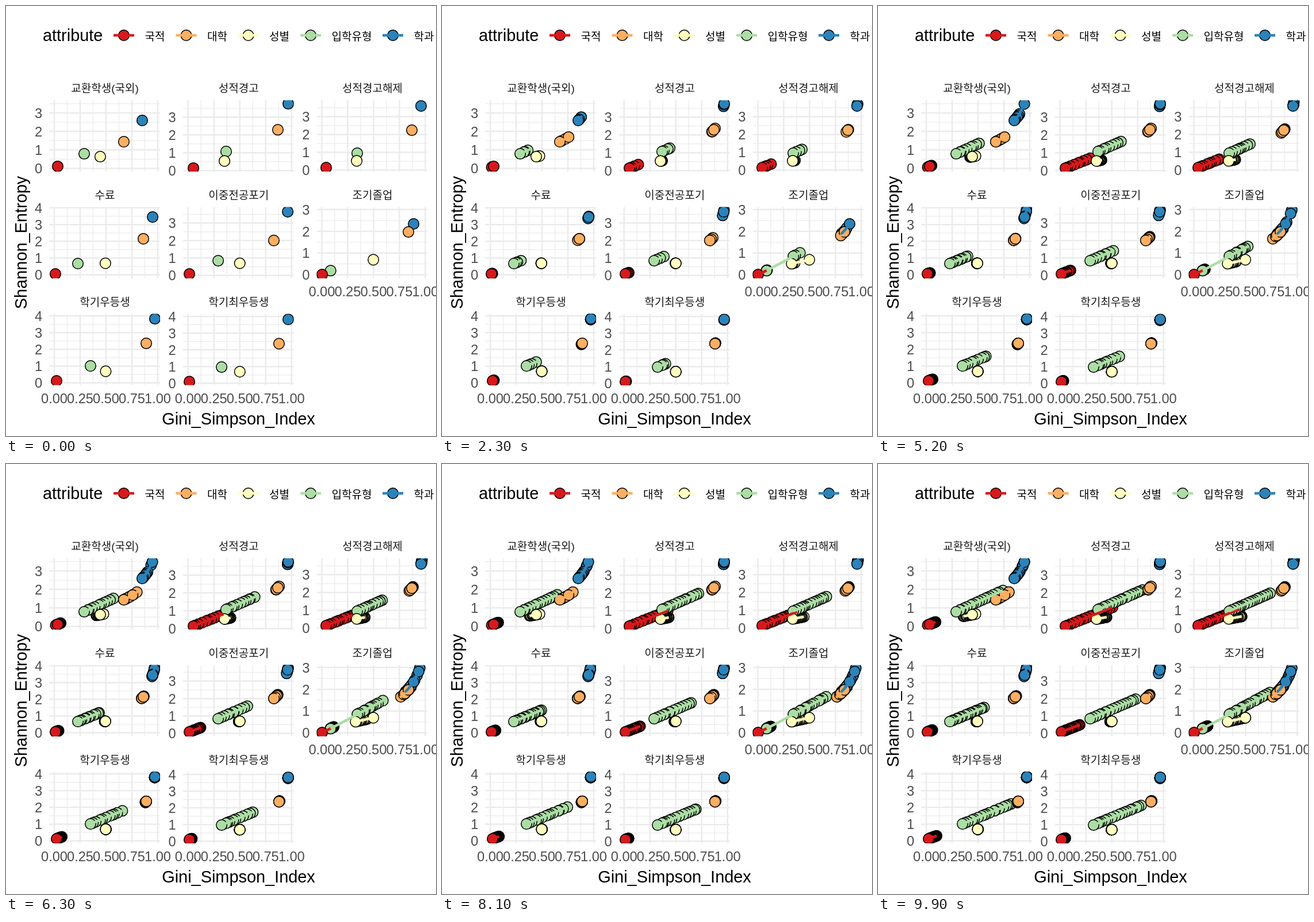
An HTML page with a canvas that plays this animation: 748x748 px, repeating every 10 s.

```html
<!DOCTYPE html>
<html lang="ko">
<head>
<meta charset="utf-8">
<style>
  html, body { margin: 0; width: 100%; height: 100%; overflow: hidden; background: #fff; }
  canvas { display: block; }
</style>
</head>
<body>
<canvas id="stage" width="748" height="748"></canvas>
<script>
const ctx = document.getElementById('stage').getContext('2d');
const FONT = '"Liberation Sans", "Noto Sans CJK KR", "Noto Sans CJK", sans-serif';
const LOOP = 10000, STEP = 100, SEMESTERS = 16;
const GRID = '#EBEBEB', TICK = '#4D4D4D';
const COL = 232.7, ROW = 185.8, WIDTH = 193, HEIGHT = 124, GINI = 180;

// Entropy (h) as a function of the Gini index (g), starting from a known point.
const linear = slope => (g, g0, h0) => h0 + slope * (g - g0);
const logarithmic = (g, g0, h0) => h0 + 0.85 * Math.log((1 - g0) / (1 - g));
const binary = g => {
  const p = (1 + Math.sqrt(Math.max(0, 1 - 2 * g))) / 2, q = 1 - p;
  return -p * Math.log(p) - (q && q * Math.log(q));
};

// Drifting attributes move steadily through their range, the others scatter in it.
const ATTRIBUTES = [
  { name: '국적', color: '#D7191C', keyX: 205, curve: linear(2.3), drifts: true },
  { name: '대학', color: '#FDAE61', keyX: 313.5, curve: logarithmic },
  { name: '성별', color: '#FFFFBF', keyX: 421.5, curve: binary, drifts: true },
  { name: '입학유형', color: '#ABDDA4', keyX: 530, curve: linear(2.55), drifts: true },
  { name: '학과', color: '#2B83BA', keyX: 673, curve: logarithmic }
];

const noise = n => {
  const v = Math.sin(n * 12.9898) * 43758.5453;
  return v - Math.floor(v);
};

const panels = [];

// Each attribute: first Gini index, first entropy, then the end and begin of the later range.
function addPanel(title, zero, unit, ...starts) {
  const n = panels.length;
  const x = 75 + n % 3 * COL, y = 164 + Math.floor(n / 3) * ROW, origin = x + 9;

  const lines = starts.map(([g0, h0, to, from = g0], k) => {
    const { curve, drifts } = ATTRIBUTES[k];
    return Array.from({ length: SEMESTERS + 1 }, (_, i) => {
      const random = noise(i + 20 * k + 100 * n + 1);
      const u = drifts ? Math.min(1, i / SEMESTERS + (random - 0.5) * 0.06) : random;
      const g = i ? from + (to - from) * u : g0;
      return { t: 9900 * i / SEMESTERS, k, x: origin + g * GINI, y: zero - curve(g, g0, h0) * unit };
    });
  });
  // Older points lie above newer ones; equal times stack from the last attribute to the first.
  const dots = lines.flat().sort((a, b) => b.t - a.t || b.k - a.k);
  panels.push({ title, zero, unit, x, y, origin, lines, dots, axis: n > 4 });
}

addPanel('교환학생(국외)', 282.5, 32.2,
  [.033, .11, .09, .011], [.672, 1.44, .8], [.444, .64, .356, .483], [.289, .79, .74], [.85, 2.59, .955]);
addPanel('성적경고', 286.3, 31,
  [.052, .14, .507], [.868, 2.29, .88, .85], [.352, .54, .45], [.368, 1.07, .8], [.968, 3.75, .968, .962]);
addPanel('성적경고해제', 285.5, 31,
  [.042, .14, .453], [.87, 2.24, .887, .842], [.337, .52, .464], [.342, .95, .736], [.959, 3.6, .972]);
addPanel('수료', 467.5, 29.1,
  [.011, .05, .06], [.861, 2.15, .87, .833], [.494, .69, .483], [.228, .67, .56], [.95, 3.45, .972, .944]);
addPanel('이중전공포기', 468.5, 30.3,
  [.013, .08, .19], [.829, 2, .868], [.5, .69, .483], [.291, .84, .73], [.963, 3.65, .968, .952]);
addPanel('조기졸업', 467.5, 37.8,
  [.003, .01, .135, .08], [.837, 1.97, .87, .76], [.498, .69, .5, .32], [.085, .19, .735, .32], [.887, 2.34, .948, .79]);
addPanel('학기우등생', 655.5, 29.1,
  [.022, .12, .1], [.889, 2.36, .889, .88], [.497, .69, .5], [.35, 1.01, .822], [.972, 3.83, .972, .97]);
addPanel('학기최우등생', 656.3, 29.1,
  [.013, .1, .052], [.879, 2.37, .885], [.5, .69, .497], [.324, .97, .795], [.968, 3.82, .968, .966]);

function text(str, x, y, size, color = '#000', align = 'left') {
  ctx.font = `${size}px ${FONT}`;
  ctx.fillStyle = color;
  ctx.textAlign = align;
  ctx.fillText(str, x, y);
}

function stroke(points, color, width) {
  ctx.beginPath();
  points.forEach(p => ctx.lineTo(p.x, p.y));
  ctx.strokeStyle = color;
  ctx.lineWidth = width;
  ctx.lineJoin = 'round';
  ctx.stroke();
}

function segment(x1, y1, x2, y2, color, width) {
  stroke([{ x: x1, y: y1 }, { x: x2, y: y2 }], color, width);
}

function dot(x, y, color) {
  ctx.beginPath();
  ctx.arc(x, y, 9.3, 0, 2 * Math.PI);
  ctx.fillStyle = color;
  ctx.fill();
  ctx.strokeStyle = '#000';
  ctx.lineWidth = 1.5;
  ctx.stroke();
}

// The part of a series passed by time t, ending in an interpolated tip.
function revealed(points, t) {
  const path = points.filter(p => p.t <= t);
  const next = points[path.length], last = path[path.length - 1];
  if (next) {
    const f = (t - last.t) / (next.t - last.t);
    path.push({ x: last.x + (next.x - last.x) * f, y: last.y + (next.y - last.y) * f });
  }
  return path;
}

function drawPanel(p, t) {
  const right = p.x + WIDTH, bottom = p.y + HEIGHT;
  text(p.title, p.x + 97, p.y - 14, 19, '#1A1A1A', 'center');

  ctx.save();
  ctx.beginPath();
  ctx.rect(p.x, p.y, WIDTH, HEIGHT);
  ctx.clip();
  for (const major of [false, true]) {
    const width = major ? 2.5 : 1.25;
    for (let i = major ? 0 : 1; i <= 8; i += 2) {
      const x = p.origin + i * GINI / 8, y = p.zero - i * p.unit / 2;
      segment(x, p.y, x, bottom, GRID, width);
      segment(p.x, y, right, y, GRID, width);
    }
  }
  p.dots.filter(d => d.t <= t).forEach(d => dot(d.x, d.y, ATTRIBUTES[d.k].color));
  p.lines.forEach((points, k) => stroke(revealed(points, t), ATTRIBUTES[k].color, 4.5));
  ctx.restore();

  for (let v = 0; p.zero - v * p.unit > p.y - 1; v++)
    text(v, p.x - 12, p.zero - v * p.unit + 8.7, 23.6, TICK, 'right');
  if (p.axis)
    for (let i = 0; i <= 4; i++)
      text((i / 4).toFixed(2), p.origin + i * GINI / 4, bottom + 31, 23.6, TICK, 'center');
}

function drawLegend() {
  text('attribute', 64, 61, 28.9);
  for (const { name, color, keyX } of ATTRIBUTES) {
    dot(keyX, 51, color);
    segment(keyX - 18, 51, keyX + 18, 51, color, 4.5);
    text(name, keyX + 36.5, 60, 19);
  }
}

function drawAxisTitles() {
  text('Gini_Simpson_Index', 404.5, 728, 28.9, '#000', 'center');
  ctx.save();
  ctx.translate(36, 411.5);
  ctx.rotate(-Math.PI / 2);
  text('Shannon_Entropy', 0, 0, 28.9, '#000', 'center');
  ctx.restore();
}

function render(now) {
  const t = Math.floor(now % LOOP / STEP) * STEP;
  ctx.fillStyle = '#fff';
  ctx.fillRect(0, 0, 748, 748);
  drawLegend();
  panels.forEach(p => drawPanel(p, t));
  drawAxisTitles();
  requestAnimationFrame(render);
}
requestAnimationFrame(render);
</script>
</body>
</html>
```
